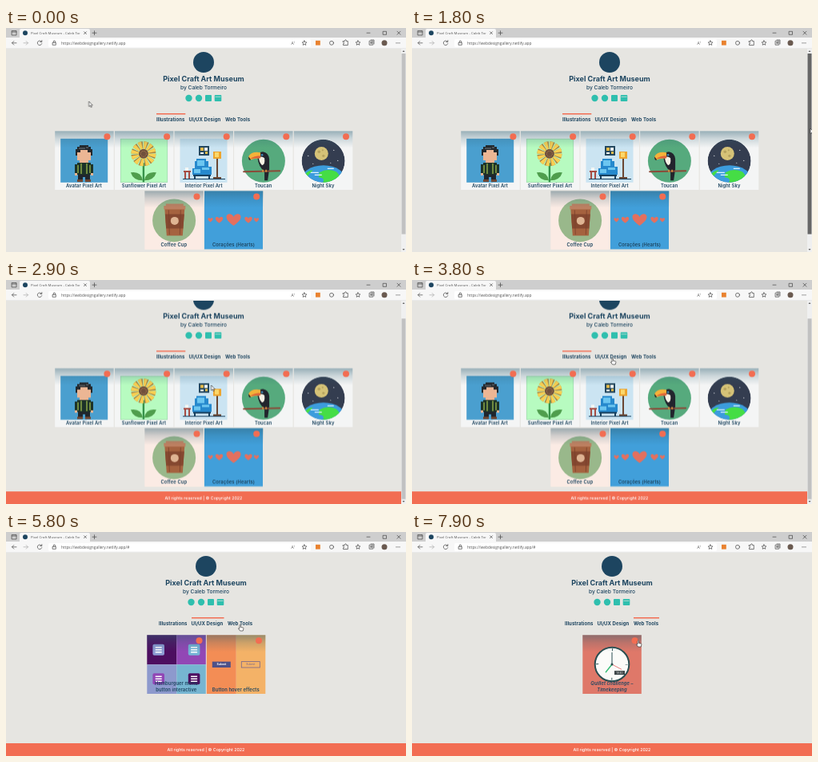
An HTML page for the animation above (8000 ms loop, 500 px wide and 281 px high).

```html
<!DOCTYPE html>
<html lang="en">
<head>
<meta charset="utf-8">
<title>Gallery tour</title>
<style>
html, body { margin: 0; width: 500px; height: 281px; overflow: hidden; background: #e6e5e1; }
svg { display: block; }
text { font-family: Inter, "Open Sans", sans-serif; fill: #1d4560; }
.mid { text-anchor: middle; }
.cap { font-size: 5.8px; font-weight: 600; letter-spacing: .1px; text-anchor: middle; }
.nav { font-size: 6px; font-weight: 700; letter-spacing: .06px; }
.ui { font-family: "Open Sans", sans-serif; fill: #555; }
.line { fill: none; stroke: #444; stroke-width: .7; stroke-linecap: round; stroke-linejoin: round; }
.px { shape-rendering: crispEdges; }
.mark { fill: #f26d52; }

.gallery, .second, .scroll, .thumb, .interface, .tools, .cursor, .arrow, .hand { animation: 8s linear infinite; }
.gallery, .second, .interface, .tools, .arrow, .hand { animation-timing-function: step-end; }
.gallery { animation-name: first-half; }
.second { animation-name: second-half; }
.interface { animation-name: until-tools; }
.tools { animation-name: from-tools; }
.scroll { animation-name: scroll; }
.thumb { animation-name: thumb; }
.thumb rect { animation: grab 8s step-end infinite; }
.cursor { animation-name: roam; }
.hand { animation-name: hand; }
.arrow { animation-name: arrow; }

@keyframes first-half { 0% { opacity: 1 } 50%, 100% { opacity: 0 } }
@keyframes second-half { 0% { opacity: 0 } 50%, 100% { opacity: 1 } }
@keyframes until-tools { 0% { opacity: 1 } 73.75%, 100% { opacity: 0 } }
@keyframes from-tools { 0% { opacity: 0 } 73.75%, 100% { opacity: 1 } }
@keyframes scroll {
  0%, 24% { transform: translateY(0) }
  28.75%, 100% { transform: translateY(-18.5px) }
}
@keyframes thumb {
  0%, 24% { transform: translateY(0) }
  28.75%, 100% { transform: translateY(16.4px) }
}
@keyframes grab { 0% { fill: #c1c1c1 } 21.5% { fill: #666 } 30%, 100% { fill: #c1c1c1 } }
@keyframes hand { 0% { opacity: 0 } 45% { opacity: 1 } 57% { opacity: 0 } 68.75% { opacity: 1 } 84% { opacity: 0 } 98.75%, 100% { opacity: 1 } }
@keyframes arrow { 0% { opacity: 1 } 45% { opacity: 0 } 57% { opacity: 1 } 68.75% { opacity: 0 } 84% { opacity: 1 } 98.75%, 100% { opacity: 0 } }
@keyframes roam {
  0% { transform: translate(103.5px, 92px) }
  7.5% { transform: translate(165.5px, 104px) }
  11.25% { transform: translate(230px, 112px) }
  22.5%, 24% { transform: translate(498px, 126px) }
  28.75% { transform: translate(498px, 143px) }
  33.75% { transform: translate(285px, 139px) }
  36.25% { transform: translate(256.5px, 132px) }
  41.25% { transform: translate(262px, 128px) }
  46.25%, 51% { transform: translate(250px, 98px) }
  56.25% { transform: translate(244px, 113px) }
  60% { transform: translate(235px, 122.5px) }
  65% { transform: translate(290px, 150px) }
  67.5% { transform: translate(300px, 152px) }
  68.75%, 74% { transform: translate(292px, 116px) }
  81.25%, 82.5% { transform: translate(296.5px, 120.5px) }
  83.75% { transform: translate(288px, 126px) }
  93.75%, 98.7% { transform: translate(279px, 163px) }
  98.75%, 100% { transform: translate(282px, 136px) }
}
</style>
</head>
<body>
<svg width="500" height="281" viewBox="0 0 500 281">
  <defs>
    <linearGradient id="fade" x2="0" y2="1">
      <stop stop-color="#2c5d70" stop-opacity=".46"/>
      <stop offset=".45" stop-color="#2c5d70" stop-opacity=".2"/>
      <stop offset="1" stop-color="#2c5d70" stop-opacity="0"/>
    </linearGradient>
    <g id="shade">
      <rect width="73.5" height="21" fill="url(#fade)"/>
      <circle class="mark" cx="65.2" cy="7" r="4"/>
    </g>
    <path id="heart" fill="#e3705f" d="M0 7C-7 2-9-1-9-4C-9-9-2-9 0-4C2-9 9-9 9-4C9-1 7 2 0 7Z"/>
    <clipPath id="sky"><circle cx="36.8" cy="37.5" r="27"/></clipPath>
    <clipPath id="tab"><rect x="30" width="62.5" height="12"/></clipPath>

    <g id="head">
      <circle cx="247" cy="43" r="13" fill="#1d4560"/>
      <text class="mid" x="247" y="67.3" font-size="9" font-weight="700">Pixel Craft Art Museum</text>
      <text class="mid" x="247" y="77.3" font-size="6.65" font-weight="500">by Caleb Tormeiro</text>
      <g fill="#2fbfae">
        <circle cx="228.5" cy="88" r="4.2"/>
        <circle cx="241" cy="88" r="4.2"/>
        <rect x="249" y="84" width="8" height="8" rx="1"/>
        <rect x="260.7" y="84" width="8.6" height="8" rx="1"/>
        <path d="M261.5 86.3h7" stroke="#e6e5e1" stroke-width=".7"/>
      </g>
      <text class="nav" x="188" y="117.2">Illustrations</text>
      <text class="nav" x="228.5" y="117.2">UI/UX Design</text>
      <text class="nav" x="274" y="117.2">Web Tools</text>
    </g>
    <g id="foot">
      <rect width="500" height="17" fill="#f26d52"/>
      <text class="mid" x="247" y="10" font-size="5.3" font-weight="500" style="fill:#fff">All rights reserved | © Copyright 2022</text>
    </g>
    <g id="menu">
      <rect x="-7.3" y="-7" width="14.6" height="14" rx="2"/>
      <path d="M-4-3h8M-4 0h8M-4 3h8" stroke="#fff" stroke-width="1.5"/>
    </g>
  </defs>

  <rect width="500" height="281" fill="#e6e5e1"/>

  <g class="gallery">
    <g class="scroll">
      <use href="#head"/>
      <rect class="mark" x="188" y="107" width="36.3" height="1.5"/>

      <g transform="translate(61.2 129.3)">
        <rect width="73.5" height="73.7" fill="#f4f5f5"/>
        <rect x="7" y="9.5" width="59" height="55" fill="#4a9fcf"/>
        <g class="px">
          <path fill="#23282c" d="M26 23h2v-3h3v-2h11v2h3v3h2v8H26z"/>
          <path fill="#4d5357" d="M30 21h8v2h-8zM39 20h3v2h-3z"/>
          <path fill="#ecb694" d="M28 27h4v-3h9v3h4v10h-3v3H31v-3h-3z"/>
          <path fill="#1d3329" d="M28 40h17v2h3v13H25V42h3z"/>
          <path fill="#6f8a40" d="M28 43h2v10h-2zM43 43h2v10h-2zM32 41h2v13h-2zM39 41h2v13h-2z"/>
          <path fill="#ecb694" d="M25 53h3v3h-3zM45 53h3v3h-3z"/>
          <path fill="#20262d" d="M29 55h15v7h-6v-4h-3v4h-6z"/>
          <path fill="#6e4632" d="M28 61h7v3h-7zM38 61h7v3h-7z"/>
        </g>
        <use href="#shade"/>
        <text class="cap" x="36.3" y="70.4">Avatar Pixel Art</text>
      </g>

      <g transform="translate(135.9 129.3)">
        <rect width="73.5" height="73.7" fill="#f4f5f5"/>
        <rect x="7.4" y="9.9" width="58.4" height="54.2" fill="#b7fbc0" stroke="#9bdcaa" stroke-width=".8"/>
        <path d="M36 40V64" stroke="#37934a" stroke-width="2.4"/>
        <path fill="#4f9e4d" d="M35 62Q23 62 20 52Q33 50 35 62M37 62Q49 62 52 52Q39 50 37 62"/>
        <g fill="none">
          <circle cx="36" cy="28.5" r="11" stroke="#a98445" stroke-width="9" stroke-dasharray="4.6 1.16"/>
          <circle cx="36" cy="28.5" r="10.5" stroke="#f8d052" stroke-width="10" stroke-dasharray="3.2 2.298"/>
        </g>
        <circle cx="36" cy="28.5" r="6" fill="#71503c"/>
        <circle cx="36" cy="28.5" r="3.5" fill="none" stroke="#b48455" stroke-dasharray="1.2"/>
        <use href="#shade"/>
        <text class="cap" x="36.6" y="70.4">Sunflower Pixel Art</text>
      </g>

      <g transform="translate(210.5 129.3)">
        <rect width="73.5" height="73.7" fill="#f4f5f5"/>
        <rect x="7" y="9.5" width="59" height="55" fill="#cbe4f2"/>
        <g class="px">
          <path fill="#24475e" d="M30 19h13v12H30z"/>
          <path fill="#e3b94a" d="M32 21h4v4h-4zM38 26h3v3h-3z"/>
          <path fill="#f1f4ef" d="M37 21h4v4h-4zM32 27h4v2h-4z"/>
          <path fill="#eda52f" d="M48 26h10v9H48z"/>
          <path fill="#fad86b" d="M50 27h5v6h-5z"/>
          <path fill="#6a4632" d="M52 35h2v25h-2zM48 58h10v2H48z"/>
          <path fill="#2689cd" d="M27 35h12v3h3v7h4v10H22V47h3v-9h2z"/>
          <path fill="#6cc6f0" d="M28 37h9v7h-9zM24 48h8v5h-8zM34 46h9v3h-9z"/>
          <path fill="#17405e" d="M23 55h22v2H23zM24 57h2v3h-2zM42 57h2v3h-2zM10 60h53v1H10z"/>
          <path fill="#a64c43" d="M11 50h9v2h-9zM12 52h2v8h-2zM17 52h2v8h-2z"/>
          <path fill="#f3f7f4" d="M13 46h4v4h-4z"/>
        </g>
        <use href="#shade"/>
        <text class="cap" x="36.6" y="70.4">Interior Pixel Art</text>
      </g>

      <g transform="translate(285.1 129.3)">
        <rect width="73.5" height="73.7" fill="#f4f5f5"/>
        <circle cx="36.8" cy="37.5" r="27" fill="#56aa7d"/>
        <path fill="#22252d" d="M29 32Q30 26 36 26Q43 27 44 35V48L42 62H38V50Q31 47 29 32"/>
        <path fill="#f7f2e5" d="M31 33Q35 31 38 34Q39 42 35 43Q31 39 31 33"/>
        <path fill="#f5b239" d="M33 27Q22 25 18 32Q18 37 21 36Q26 34 33 34z"/>
        <path fill="#df6439" d="M33 31Q25 31 20 35Q26 34 33 34z"/>
        <path fill="#20242c" d="M18 32Q18 38 21 36z"/>
        <circle cx="35" cy="30" r="1.3" fill="#418dbc"/>
        <path d="M12 51L57 50" stroke="#8a4a38" stroke-width="2" stroke-linecap="round"/>
        <path d="M36 48.5v3M40 48.5v3" stroke="#e19b3c" stroke-width="1.5"/>
        <use href="#shade"/>
        <text class="cap" x="36.6" y="70.4">Toucan</text>
      </g>

      <g transform="translate(359.8 129.3)">
        <rect width="73.5" height="73.7" fill="#f4f5f5"/>
        <g clip-path="url(#sky)">
          <circle cx="36.8" cy="37.5" r="27" fill="#343d50"/>
          <circle cx="34.5" cy="28.3" r="8.5" fill="#d5c277"/>
          <g fill="#b5a25e"><circle cx="31.5" cy="26" r="1.8"/><circle cx="37" cy="31" r="1.6"/><circle cx="36" cy="24" r="1.1"/></g>
          <g fill="#fff"><circle cx="18" cy="31" r=".6"/><circle cx="50" cy="24" r=".6"/><circle cx="55" cy="37" r=".6"/><circle cx="24" cy="41" r=".5"/><circle cx="46" cy="40" r=".5"/></g>
          <ellipse cx="37" cy="63" rx="29" ry="20" fill="#3c9cdd"/>
          <path fill="#45dd45" d="M32 52Q42 46 53 51Q60 57 57 65H36Q40 59 31 58zM13 55Q18 49 24 49Q20 53 16 58z"/>
          <path d="M21 52h10M26 55h9M42 47h8" stroke="#e1f5ff" stroke-width="1.2"/>
        </g>
        <use href="#shade"/>
        <text class="cap" x="36.6" y="70.4">Night Sky</text>
      </g>

      <g transform="translate(173.3 204.4)">
        <rect width="73.5" height="73.5" fill="#fbebe4"/>
        <circle cx="36.8" cy="37" r="27" fill="#99b88b"/>
        <path fill="#a5623f" d="M25 22H50L47.5 56H27.5z"/>
        <path fill="#bd8061" d="M24 18.5h27v4.5H24zM26.5 16h22v2.5h-22z"/>
        <path fill="#854830" d="M25.6 29h23.9l-1.4 18H26.9z"/>
        <circle cx="37.5" cy="37.5" r="5" fill="#dfb493"/>
        <path d="M30 24l1 31M45 24l-1 31" stroke="#7a412d" stroke-width=".8"/>
        <use href="#shade"/>
        <text class="cap" x="36.5" y="69.9">Coffee Cup</text>
      </g>

      <g transform="translate(248 204.5)">
        <rect width="73" height="73" fill="#419fda"/>
        <use href="#heart" x="36.5" y="36.5"/>
        <use href="#heart" transform="translate(18.5 36.5) scale(.52)"/>
        <use href="#heart" transform="translate(55 36.5) scale(.52)"/>
        <use href="#heart" transform="translate(7.5 36.5) scale(.34)"/>
        <use href="#heart" transform="translate(65 36.5) scale(.34)"/>
        <use href="#shade"/>
        <text class="cap" x="36.5" y="69.9">Corações (Hearts)</text>
      </g>
      <use href="#foot" y="283.5"/>
    </g>

    <rect x="494" y="25" width="6" height="256" fill="#f0f0f0"/>
    <g class="thumb"><rect x="494.5" y="32" width="5" height="226.6" fill="#c1c1c1"/></g>
    <path fill="#666" d="M495.5 30l1.5-2 1.5 2zM495.5 277l1.5 2 1.5-2z"/>
  </g>

  <g class="second">
    <use href="#head" x="3"/>
    <g class="interface">
      <rect class="mark" x="232" y="107" width="40.5" height="1.5"/>
      <g transform="translate(176.3 129.3)">
        <path fill="#4d0e60" d="M0 0h37v37H0z"/>
        <path fill="#9247b5" d="M37 0h36.5v37H37z"/>
        <path fill="#8d99cd" d="M0 37h37v36.7H0z"/>
        <path fill="#76b5d1" d="M37 37h36.5v36.7H37z"/>
        <use href="#menu" x="14.4" y="18.5" fill="#8d9bd3"/>
        <use href="#menu" x="58.8" y="18.5" fill="#76b5d6"/>
        <use href="#menu" x="14.4" y="55" fill="#9145b5"/>
        <use href="#menu" x="58.8" y="55" fill="#4d0e60"/>
        <use href="#shade"/>
        <text class="cap" x="36.5" y="63">Hamburguer menu</text>
        <text class="cap" x="36.5" y="70.4">button interactive</text>
      </g>
      <g transform="translate(250.8 129.3)">
        <path fill="#f38d55" d="M0 0h37v73.7H0z"/>
        <path fill="#f4b267" d="M37 0h36.5v73.7H37z"/>
        <rect x="7" y="33.3" width="23" height="7.4" fill="#4e5188"/>
        <text class="mid" x="18.5" y="38.2" font-size="3.4" font-weight="700" style="fill:#fff">Submit</text>
        <rect x="43.5" y="33.3" width="23" height="7.4" fill="none" stroke="#77658a" stroke-width=".8"/>
        <text class="mid" x="55" y="38.2" font-size="3.4" style="fill:#77658a">Submit</text>
        <use href="#shade"/>
        <text class="cap" x="36.5" y="70.4">Button hover effects</text>
      </g>
    </g>

    <g class="tools">
      <rect class="mark" x="277" y="107" width="32" height="1.5"/>
      <g transform="translate(213.3 129.3)">
        <rect width="73.5" height="73.7" fill="#df7869"/>
        <circle cx="36.7" cy="36.7" r="21.3" fill="#fbfbf9" stroke="#294d50" stroke-width="2"/>
        <circle cx="36.7" cy="36.7" r="18.2" fill="none" stroke="#294d50" stroke-width="3" stroke-dasharray="1 27.588" stroke-dashoffset=".5"/>
        <g fill="none" stroke-linecap="round">
          <path d="M36.7 36.7V22" stroke="#294d50" stroke-width="1"/>
          <path d="M36.7 36.7L29 46.5" stroke="#35bd75" stroke-width="1.4"/>
          <path d="M36.7 36.7L48.5 43" stroke="#e45c5c" stroke-width=".8"/>
        </g>
        <circle cx="36.7" cy="36.7" r="1.5" fill="#294d50"/>
        <rect x="39.7" y="44.8" width="13" height="5" fill="#3d4548"/>
        <text class="mid" x="46.2" y="48.5" font-size="3.2" style="fill:#eee">19:40</text>
        <use href="#shade"/>
        <g font-style="italic">
          <text class="cap" x="36.7" y="63">Quillet challenge –</text>
          <text class="cap" x="36.7" y="70.4">Timekeeping</text>
        </g>
      </g>
    </g>
    <use href="#foot" x="3" y="265"/>
    <rect class="mark" y="265" width="4" height="17"/>
  </g>

  <g>
    <rect width="500" height="13" fill="#cecece"/>
    <path fill="#f7f7f7" d="M0 12h17V3q0-2 2-2h84q2 0 2 2v9h395v14H0z"/>
    <rect x="53" y="14" width="328" height="10" rx="2" fill="#fff"/>
    <circle cx="24" cy="6.2" r="3" fill="#1d4560"/>
    <g clip-path="url(#tab)">
      <text class="ui" x="31" y="7.9" font-size="4.35">Pixel Craft Museum - Caleb Tormeiro</text>
    </g>
    <text class="ui" x="69" y="20.6" font-size="4.85">https://webdesigngallery.netlify.app<tspan class="second">/#</tspan></text>
    <g class="line">
      <path d="M7.5 3.5h5.5v5.5H7.5zM7.5 5h5.5M97.5 4.7l3 3m0-3l-3 3M108 6.2h5M110.5 3.7v5"/>
      <path d="M451 6.2h4M471.5 4.3h4v4h-4zM489 4.2l4 4m0-4l-4 4"/>
      <path d="M13 18.8H7.5l2.3-2.3M7.5 18.8l2.3 2.3M44.5 17.3a2.8 2.8 0 1 0 .3 2.3M44.8 15.5v2h-2"/>
      <path stroke="#aaa" d="M22 18.8h5.5l-2.3-2.3M27.5 18.8l-2.3 2.3"/>
      <path d="M58.5 18.3h3.8v3h-3.8zM59.3 18v-1a1.1 1.1 0 0 1 2.2 0v1"/>
      <path d="M373 15.9l.9 1.9 2 .2-1.5 1.4.4 2-1.8-1-1.8 1 .4-2-1.5-1.4 2-.2z"/>
      <circle cx="407" cy="18.8" r="2.5"/>
      <path d="M421.5 16.5h2q0-1.7 1-1.7t1 1.7h1.8v5h-5.8v-1.7q1.3-.2 1.3-1t-1.3-1z"/>
      <path d="M440 15.8l.9 1.9 2 .2-1.5 1.4.4 2-1.8-1-1.8 1 .4-2-1.5-1.4 2-.2z"/>
      <path d="M454.5 16.2h4.2v5h-4.2zM456 15h4v5M456.6 17.3v2.6m-1.2-1.3h2.4"/>
    </g>
    <text class="ui" x="356.5" y="20.8" font-size="5">A⁾</text>
    <rect x="387" y="15.8" width="5.8" height="5.8" fill="#e9822f"/>
    <circle cx="473" cy="18.8" r="3.5" fill="#6a5a50"/>
    <g fill="#444"><circle cx="488" cy="18.8" r=".6"/><circle cx="490" cy="18.8" r=".6"/><circle cx="492" cy="18.8" r=".6"/></g>
    <path d="M0 25.6h500" stroke="#ddd" stroke-width=".6"/>
  </g>

  <g class="cursor" fill="#fff" stroke="#222" stroke-width=".6" stroke-linejoin="round">
    <path class="arrow" d="M0 0v6.5l1.5-1.3 1.1 2.4 1-.5-1-2.3h2z"/>
    <path class="hand" d="M0 .7q.7-1.2 1.4 0v2.7l2.9.6q.8.3.6 1.2l-.7 2.8H.6L-1.6 5q.2-1 1.6.1z"/>
  </g>
</svg>
</body>
</html>
```
